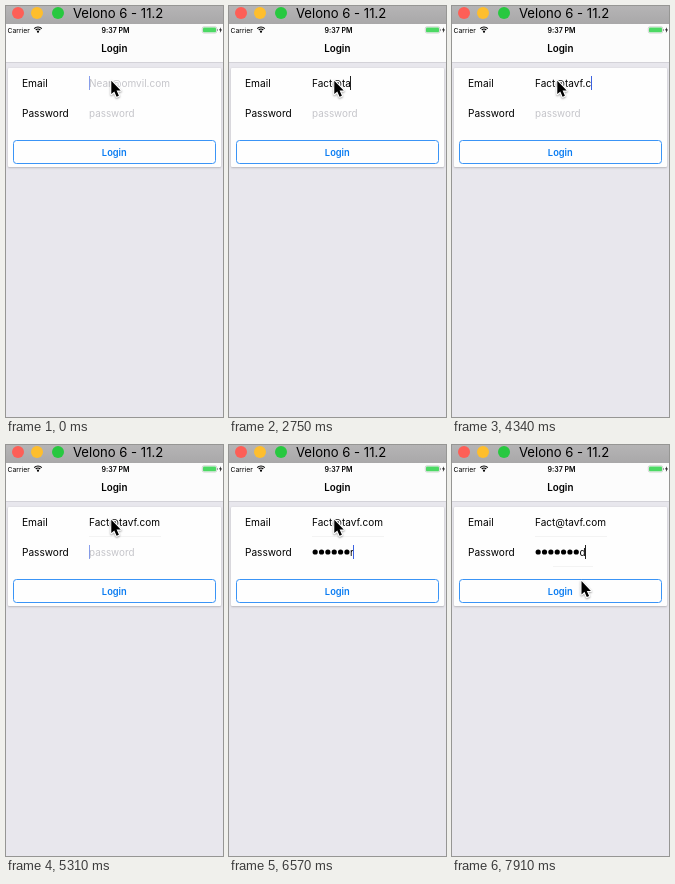
An HTML page with a canvas for the animation above (8 s loop, 217 by 411 pixels).

```html
<!DOCTYPE html>
<html lang="en">
<head>
<meta charset="utf-8">
<title>Login form</title>
<style>
html, body { margin: 0; width: 100%; height: 100%; overflow: hidden; background: #e8e7ed; }
canvas { display: block; width: 217px; height: 411px; }
</style>
</head>
<body>
<canvas id="stage"></canvas>
<script>
const LOOP = 8000, FIELD_X = 83, DOT_STEP = 6.35;
const EMAIL = 'Fact@tavf.com', PASSWORD = 'password';
const emailKeys = [610, 790, 1060, 1150, 2040, 2580, 2750, 3020, 3190, 4070, 4340, 4420, 4600];
const passwordKeys = [5670, 5760, 5940, 6120, 6300, 6390, 6570, 6750];
const FOCUS_PASSWORD = 4770, MOVE_START = 7280, MOVE_STEP = 90, MOVE_COUNT = 8;
// [time, opacity] of the blinking caret
const blink = [
  [0, .6], [90, .3], [170, 0], [520, .5], [610, 1],
  [1770, .6], [1860, .3], [1950, 0], [2040, 1],
  [3730, .6], [3815, .3], [3900, 0], [4070, 1],
  [5310, .6], [5400, .3], [5490, 0], [5670, 1],
  [7280, .6], [7370, .3], [7460, 0], [7820, .5], [7910, 1]
];

const canvas = document.getElementById('stage');
const ctx = canvas.getContext('2d');
const dpr = window.devicePixelRatio || 1;
canvas.width = 217 * dpr;
canvas.height = 411 * dpr;
ctx.scale(dpr, dpr);

const font = (size, weight = 400) => `${weight} ${size}px Inter, "Liberation Sans", sans-serif`;

function text(str, x, y, size, color = '#000', weight = 400, align = 'left') {
  ctx.font = font(size, weight);
  ctx.fillStyle = color;
  ctx.textAlign = align;
  ctx.fillText(str, x, y);
}

function rect(x, y, w, h, color) {
  ctx.fillStyle = color;
  ctx.fillRect(x, y, w, h);
}

function round(x, y, w, h, r) {
  ctx.beginPath();
  ctx.roundRect(x, y, w, h, r);
}

function dot(x, y, r, color) {
  ctx.beginPath();
  ctx.arc(x, y, r, 0, Math.PI * 2);
  ctx.fillStyle = color;
  ctx.fill();
}

const typed = (keys, t) => keys.filter(k => k <= t).length;

function drawWindowBar() {
  const shade = ctx.createLinearGradient(0, 0, 0, 18);
  shade.addColorStop(0, '#b5b4b5');
  shade.addColorStop(1, '#a9a8a9');
  rect(0, 0, 217, 18, shade);
  dot(12, 7, 6, '#fd5f57');
  dot(31, 7, 6, '#febe2d');
  dot(52, 7, 6, '#28c840');
  text('Velono 6 - 11.2', 67, 12, 13.1, '#000');
}

function drawBattery() {
  round(196.3, 20.8, 14.4, 6.2, 1.6);
  ctx.strokeStyle = '#b4bab6';
  ctx.lineWidth = .6;
  ctx.stroke();
  round(197, 21.5, 13, 4.8, 1);
  ctx.fillStyle = '#4cd964';
  ctx.fill();
  rect(211.2, 23, .8, 2, '#8e8e93');
  ctx.fillStyle = '#000';
  ctx.fill(new Path2D('M215 21.2L213 24.3H214.4L213.8 27L216 23.6H214.6Z'));
}

function drawStatusBar() {
  rect(0, 18, 217, 38, '#fcfcfc');
  rect(0, 56, 217, 1, '#d3d2d8');
  text('Carrier', 1.5, 26.6, 6.8);
  ctx.strokeStyle = '#000';
  ctx.lineWidth = 1.2;
  for (const r of [3.2, 5.3]) {
    ctx.beginPath();
    ctx.arc(32, 26.3, r, -Math.PI * .75, -Math.PI * .25);
    ctx.stroke();
  }
  dot(32, 25.7, 1.1, '#000');
  text('9:37 PM', 109.5, 26.6, 7, '#000', 600, 'center');
  drawBattery();
  text('Login', 108.3, 46, 9.8, '#000', 600, 'center');
}

function drawCard() {
  ctx.save();
  ctx.shadowColor = 'rgba(0,0,0,.25)';
  ctx.shadowBlur = 2 * dpr;
  ctx.shadowOffsetY = .7 * dpr;
  round(2, 62, 213, 99, 1);
  ctx.fillStyle = '#fefefe';
  ctx.fill();
  ctx.restore();
  text('Email', 16, 81, 10.2);
  text('Password', 16, 111, 10.1);
  round(7.5, 134.5, 202, 23, 3);
  ctx.strokeStyle = '#3a94f6';
  ctx.lineWidth = 1;
  ctx.stroke();
  text('Login', 108.3, 149.7, 9.3, '#0a7cf2', 600, 'center');
}

// Both fields; returns the caret's place
function drawFields(t) {
  const mail = EMAIL.slice(0, typed(emailKeys, t));
  const count = typed(passwordKeys, t);
  const hint = '#c5c5ca';
  text(mail || 'Near@omvil.com', FIELD_X, 81, 10, mail ? '#000' : hint);
  const mailEnd = FIELD_X + ctx.measureText(mail).width;
  if (t >= FOCUS_PASSWORD) rect(FIELD_X, 91, 72, 1, '#f3f3f3');
  if (t >= MOVE_START) rect(101, 121, 40, 1, '#f3f3f3');

  let end = FIELD_X;
  if (count) {
    for (let i = 0; i < count - 1; i++) dot(FIELD_X + (i + .5) * DOT_STEP, 107, 2.6, '#000');
    const last = PASSWORD[count - 1];
    end += (count - 1) * DOT_STEP;
    text(last, end, 111, 10);
    end += ctx.measureText(last).width;
  } else {
    text('password', FIELD_X, 110.6, 9.9, hint);
  }
  return t < FOCUS_PASSWORD ? [mailEnd, 70] : [end, 100];
}

function drawCaret(t, [x, y]) {
  const dark = (t >= 2580 && t < 3020) || t >= MOVE_START;
  ctx.globalAlpha = blink.filter(b => b[0] <= t).pop()[1];
  rect(Math.floor(x), y, 1, 14, dark ? '#222' : '#3c62e0');
  ctx.globalAlpha = 1;
}

function drawPointer(t) {
  const step = Math.floor((t - MOVE_START) / MOVE_STEP) + 1;
  const p = Math.min(1, Math.max(0, step / MOVE_COUNT));
  const e = p * p * (3 - 2 * p);
  const arrow = new Path2D('M0 0V13.4L3 10.7L5.3 16L7.6 15L5.3 9.9H9.4Z');
  ctx.save();
  ctx.translate(105.3 + 24.2 * e, 74.7 + 61.3 * e);
  ctx.lineJoin = 'round';
  ctx.lineWidth = 2.2;
  ctx.strokeStyle = '#fff';
  ctx.shadowColor = 'rgba(0,0,0,.35)';
  ctx.shadowBlur = 2 * dpr;
  ctx.shadowOffsetY = dpr;
  ctx.stroke(arrow);
  ctx.shadowColor = 'transparent';
  ctx.fillStyle = '#000';
  ctx.fill(arrow);
  ctx.restore();
}

function draw(t) {
  rect(0, 0, 217, 411, '#e8e7ed');
  drawWindowBar();
  drawStatusBar();
  drawCard();
  drawCaret(t, drawFields(t));
  drawPointer(t);
}

const start = performance.now();
function tick() {
  draw((performance.now() - start) % LOOP);
  requestAnimationFrame(tick);
}
tick();
</script>
</body>
</html>
```
